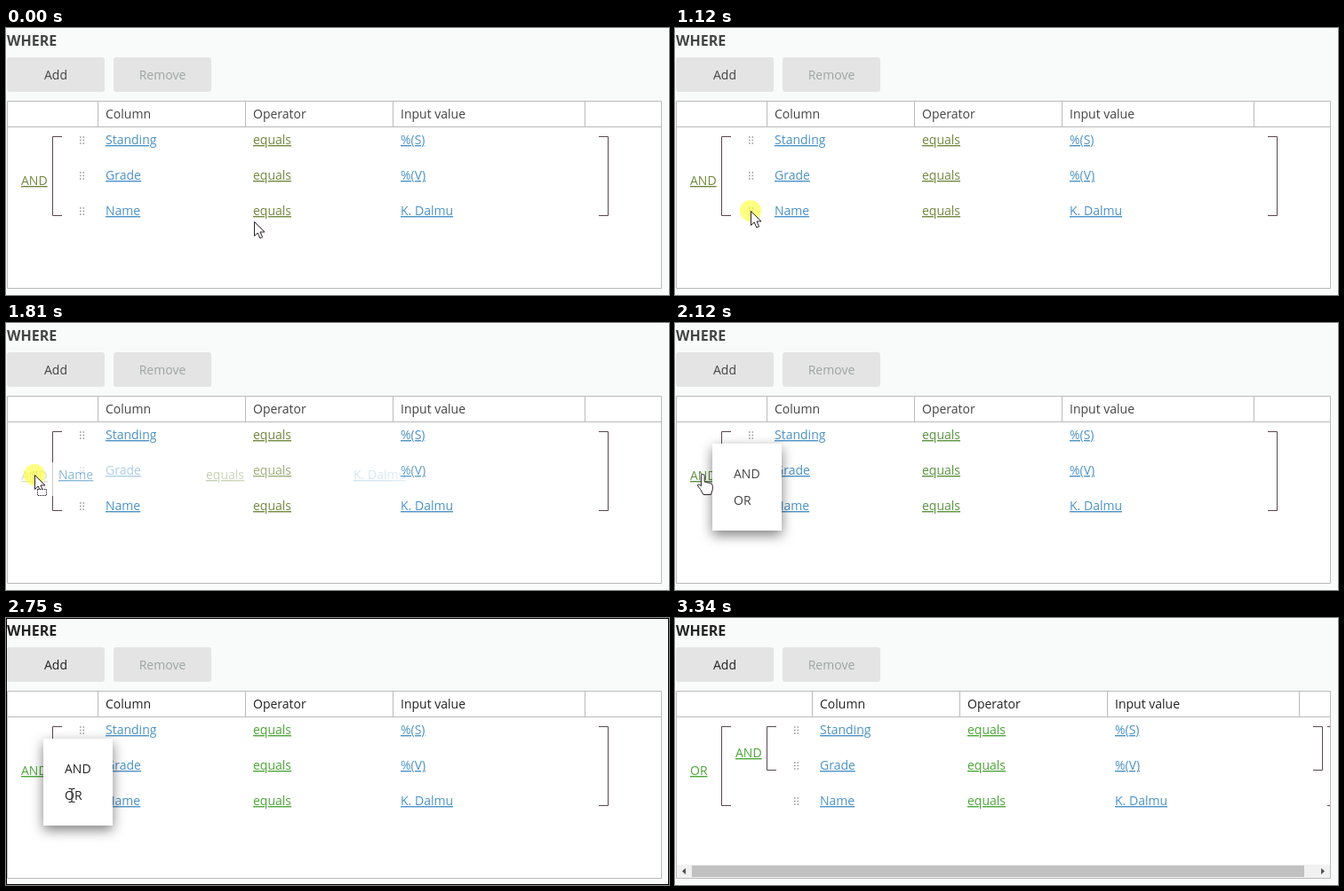
Animation, 746 px wide and 301 px high, one loop 4030 ms. Source, as an HTML page:

```html
<!DOCTYPE html>
<html lang="en">
<meta charset="utf-8">
<title>WHERE editor</title>
<style>
html, body { margin: 0; width: 100%; height: 100%; overflow: hidden; background: #f9fafa }
svg { display: block; font: 14px "Open Sans", sans-serif; --ink: #444; --green: #71893f }
text { fill: var(--ink); white-space: pre }
.title { font-weight: 700; font-size: 16px }
.button { fill: #e4e4e4 }
.mid { text-anchor: middle }
.off { fill: #9ba5a2 }
.link { fill: #4b92c6; text-decoration: underline }
.op { fill: var(--green); text-decoration: underline }
.line { fill: none; stroke: #bababa }
.bracket { fill: none; stroke: #594650 }
.dots { stroke: #999; stroke-width: 1.6; stroke-dasharray: 1.6 1.9 }
.popup { fill: #fff; filter: drop-shadow(0 5px 7px rgba(0, 0, 0, .5)) }
.cursor { fill: #fff; stroke: #2b222b; stroke-linejoin: round }
</style>
<svg id="stage" width="746" height="301" viewBox="0 0 746 301"></svg>
<script>
const LOOP = 4030, NEST = 51, GRAB = [85, 206];
const stage = document.getElementById('stage');
const $ = id => document.getElementById(id);

const text = (x, y, label, cls = '', id = '') =>
  `<text x="${x}" y="${y}" class="${cls}" id="${id}">${label}</text>`;
const path = (d, cls, id = '') => `<path d="${d}" class="${cls}" id="${id}"/>`;
const row = (y, name, value) =>
  path(`M83.8 ${y - 8.8}v8.8M87.3 ${y - 8.8}v8.8`, 'dots') +
  text(112, y, name, 'link') + text(278, y, 'equals', 'op') + text(444, y, value, 'link');
const brackets = (bottom, right = 677.5) =>
  `M63 122.5H52.5V${bottom}H63M${right - 10.5} 122.5H${right}V${bottom}H${right - 10.5}`;
const lastRow = row(211, 'Name', 'K. Dalmu');

stage.innerHTML = `
<defs>
  <clipPath id="inside"><rect x="2" y="83" width="735" height="210"/></clipPath>
  <radialGradient id="fade" gradientUnits="userSpaceOnUse" cx="${GRAB[0]}" cy="${GRAB[1]}" r="600">
    <stop stop-color="#fff" stop-opacity=".75"/>
    <stop offset=".1" stop-color="#fff" stop-opacity=".62"/>
    <stop offset=".36" stop-color="#fff" stop-opacity=".36"/>
    <stop offset=".65" stop-color="#fff" stop-opacity=".22"/>
    <stop offset=".8" stop-color="#fff" stop-opacity="0"/>
  </radialGradient>
  <mask id="ghostMask" maskUnits="userSpaceOnUse" x="70" y="192" width="620" height="38" style="mask-type:alpha">
    <rect x="70" y="192" width="620" height="38" fill="url(#fade)"/>
  </mask>
</defs>
<rect width="746" height="301" fill="#f9fafa"/>
${text(1, 20, 'WHERE', 'title')}
<rect x="1" y="33" width="110" height="39" rx="3" class="button"/>
<rect x="121" y="33" width="110" height="39" rx="3" class="button"/>
${text(56, 58, 'Add', 'mid') + text(176, 58, 'Remove', 'mid off')}
<rect x="1.5" y="82.5" width="736" height="211" fill="#fff"/>
<g clip-path="url(#inside)">
  <g id="grid">
    ${path('M103.5 83v28M269.5 83v28M435.5 83v28M651.5 83v28', 'line')}
    ${text(112, 102, 'Column') + text(278, 102, 'Operator') + text(444, 102, 'Input value')}
    ${row(131, 'Standing', '%(S)') + row(171, 'Grade', '%(V)') + lastRow}
    ${path('', 'bracket', 'inner') + text(17, 177, 'AND', 'op', 'and')}
  </g>
  <g id="outer">
    ${path(brackets(211.5, 744.5), 'bracket') + text(17, 177, 'OR', 'op')}
    <rect x="2" y="278" width="735" height="15" fill="#f1f1f1"/>
    <rect x="19" y="279" width="689" height="13" fill="#c1c1c1"/>
    <path d="M12 282v7l-4-3.5zM727 282v7l4-3.5z" fill="#505050"/>
  </g>
</g>
${path('M1.5 82.5h736v211h-736zM2 111.5h735', 'line')}
<g id="ghost"><g mask="url(#ghostMask)">
  <rect x="70" y="192" width="620" height="38" fill="#fff"/>${lastRow}
</g></g>
<g id="popup">
  <rect x="42" y="136" width="78" height="98" class="popup"/>
  ${text(66, 175, 'AND') + text(66, 205, 'OR')}
</g>
<g id="pointer">
  <circle id="press" r="12" fill="#ff3" opacity=".62"/>
  ${path('M.5.5V16.5l3.7-3.5 2.6 6 2.8-1.2-2.6-5.8h5z', 'cursor', 'arrow')}
  <g id="parcel"><rect x="3.5" y="16.5" width="10" height="7" class="cursor" stroke-dasharray="1.5 1"/></g>
  ${path('M-1.6 1.5a1.9 1.9 0 0 1 3.8 0v6.5l6.5 1.6q2.6.6 2.6 3.2v4l-2 5.7h-8.3l-3.4-6-3.4-4.5q1-2.3 4.2.8z', 'cursor', 'hand')}
  ${path('M-3.5-7.5h3l.5 1 .5-1h3M0-7V7M-3.5 7.5h3l.5-1 .5 1h3', 'cursor', 'beam')}
</g>
<rect id="frame" x=".5" y=".5" width="745" height="300" fill="none" stroke="#000"/>`;

// start, end, steps, target x, target y, ease-out power
const moves = [
  [70, 280, 4, 113, 212, 1.4],
  [430, 740, 5, 90, 208, 1.4],
  [970, 1120, 3, ...GRAB, 1],
  [1280, 1810, 8, 32, 171, 1],
  [2120, 2120, 1, 31, 171, 1],
  [2440, 2750, 5, 74, 200, 1],
  [3120, 3340, 4, 596, 302, 1]
];

function pointerAt(t) {
  let x = 279, y = 218;
  for (const [start, end, steps, tx, ty, power] of moves) {
    if (t < start) break;
    const step = t >= end ? steps : Math.floor((t - start) / (end - start) * (steps - 1)) + 1;
    const p = 1 - (1 - step / steps) ** power;
    x += (tx - x) * p;
    y += (ty - y) * p;
  }
  return [Math.round(x), Math.round(y)];
}

function draw(t) {
  const during = (a, b) => t >= a && t < b;
  const show = (id, on) => $(id).style.display = on ? '' : 'none';
  const [x, y] = pointerAt(t);
  const nested = t >= 2970, dragging = during(1280, 2120);
  const hand = during(2120, 2520), beam = during(2680, 2970);

  stage.style.setProperty('--ink', t < 2750 ? '#444' : '#222');
  stage.style.setProperty('--green', t < 2120 ? '#71893f' : t < 2750 ? '#5c9440' : '#4ea63a');
  $('grid').setAttribute('transform', `translate(${nested ? NEST : 0})`);
  $('inner').setAttribute('d', brackets(nested ? 171.5 : 211.5));
  $('and').setAttribute('y', nested ? 157 : 177);
  $('pointer').setAttribute('transform', `translate(${x} ${y})`);
  $('ghost').setAttribute('transform', `translate(${x - GRAB[0]} ${y - GRAB[1]})`);

  show('outer', nested);
  show('ghost', dragging);
  show('parcel', dragging);
  show('press', during(1120, 2120) || during(2810, 2970));
  show('popup', during(2120, 2970));
  show('hand', hand);
  show('beam', beam);
  show('arrow', !hand && !beam);
  show('pointer', t < 3340);
  show('frame', during(2750, 2810));
}

const began = performance.now();
function tick() {
  draw((performance.now() - began) % LOOP);
  requestAnimationFrame(tick);
}
tick();
</script>
</html>
```
